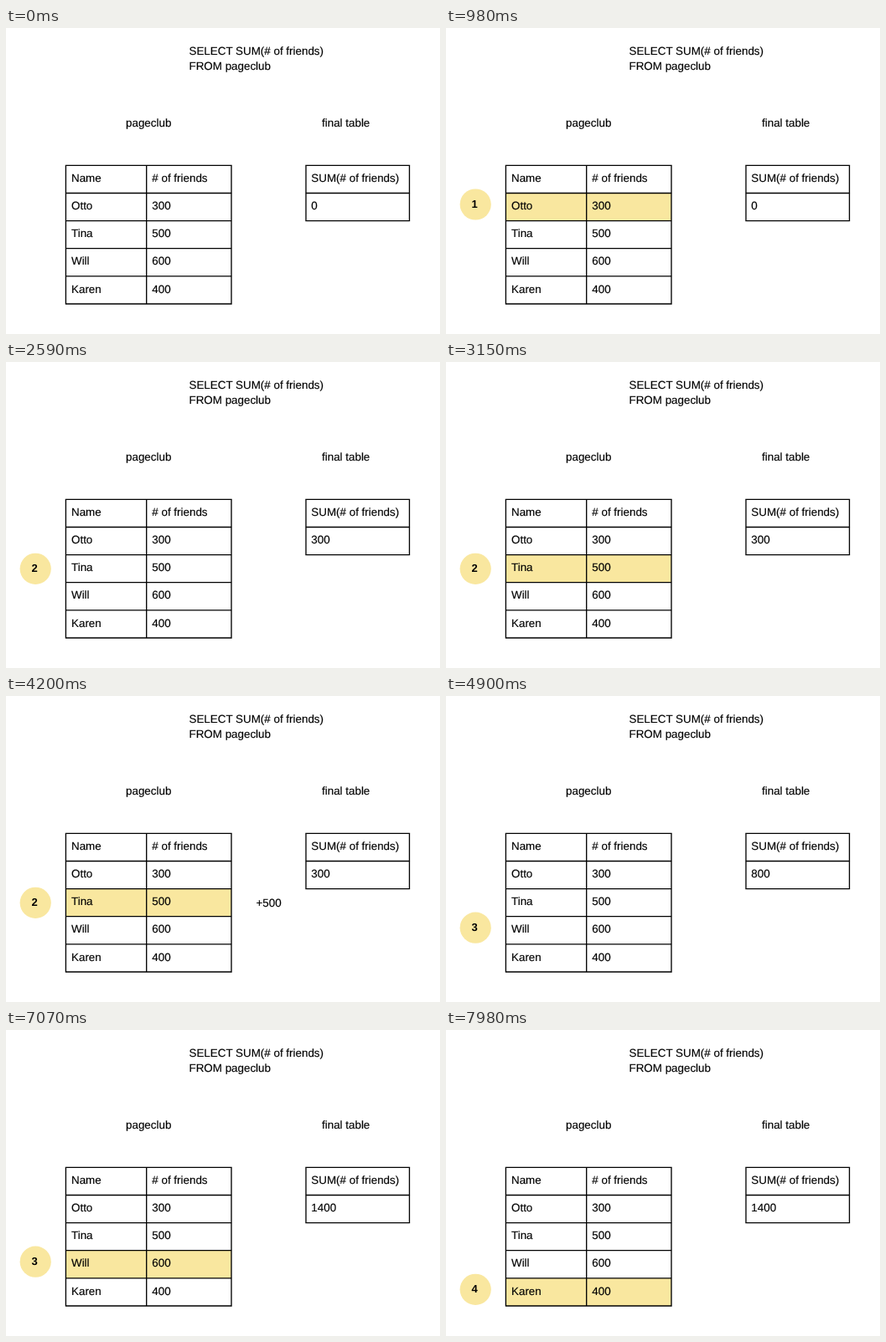
An HTML page for the animation above (8 s loop, 518 px wide and 366 px high).

```html
<!DOCTYPE html>
<html lang="en">
<head>
<meta charset="utf-8">
<title>SUM query, row by row</title>
<style>
html, body { margin: 0; width: 100%; height: 100%; overflow: hidden; background: #fff; }
svg { display: block; width: 518px; height: 366px; }
text {
  font: 13.4px "Liberation Sans", Arial, sans-serif;
  text-rendering: geometricPrecision;
  fill: #000; stroke: #000; stroke-width: .15;
}
.mark text { font-size: 13px; font-weight: bold; text-anchor: middle; stroke: none; }
.mark circle, .row { fill: #f9e79f; }
.grid { fill: none; stroke: #000; stroke-width: 1.33; }

/* each timed part is hidden except inside its own window */
.mark, .row, .add, .sum { opacity: 0; animation: 8s step-end infinite; }

.mark.a { animation-name: mark-a; }
.mark.b { animation-name: mark-b; }
.mark.c { animation-name: mark-c; }
.mark.d { animation-name: mark-d; }
@keyframes mark-a { 0% { opacity: 0 } 5.25% { opacity: 1 } 29.75% { opacity: 0 } }
@keyframes mark-b { 0% { opacity: 0 } 29.75% { opacity: 1 } 59.5% { opacity: 0 } }
@keyframes mark-c { 0% { opacity: 0 } 59.5% { opacity: 1 } 89.25% { opacity: 0 } }
@keyframes mark-d { 0% { opacity: 0 } 89.25%, 100% { opacity: 1 } }

.row.a { animation-name: row-a; }
.row.b { animation-name: row-b; }
.row.c { animation-name: row-c; }
.row.d { animation-name: row-d; }
@keyframes row-a { 0% { opacity: 0 } 11.375% { opacity: 1 } 29.75% { opacity: 0 } }
@keyframes row-b { 0% { opacity: 0 } 39.375% { opacity: 1 } 59.5% { opacity: 0 } }
@keyframes row-c { 0% { opacity: 0 } 65.625% { opacity: 1 } 89.25% { opacity: 0 } }
@keyframes row-d { 0% { opacity: 0 } 93.625%, 100% { opacity: 1 } }

.add.a { animation-name: add-a; }
.add.b { animation-name: add-b; }
.add.c { animation-name: add-c; }
@keyframes add-a { 0% { opacity: 0 } 17.5% { opacity: 1 } 24.5% { opacity: 0 } }
@keyframes add-b { 0% { opacity: 0 } 46.375% { opacity: 1 } 54.25% { opacity: 0 } }
@keyframes add-c { 0% { opacity: 0 } 72.625% { opacity: 1 } 80.5% { opacity: 0 } }

.sum.a { animation-name: sum-a; }
.sum.b { animation-name: sum-b; }
.sum.c { animation-name: sum-c; }
.sum.d { animation-name: sum-d; }
@keyframes sum-a { 0% { opacity: 1 } 24.5% { opacity: 0 } }
@keyframes sum-b { 0% { opacity: 0 } 24.5% { opacity: 1 } 54.25% { opacity: 0 } }
@keyframes sum-c { 0% { opacity: 0 } 54.25% { opacity: 1 } 80.5% { opacity: 0 } }
@keyframes sum-d { 0% { opacity: 0 } 80.5%, 100% { opacity: 1 } }
</style>
</head>
<body>
<svg viewBox="0 0 518 366">
  <text x="218.5" y="32">SELECT SUM(# of friends)</text>
  <text x="218.5" y="50">FROM pageclub</text>
  <text x="143" y="118">pageclub</text>
  <text x="377" y="118">final table</text>

  <rect class="row a" x="71.5" y="197.5" width="197.5" height="33"/>
  <rect class="row b" x="71.5" y="230.5" width="197.5" height="33"/>
  <rect class="row c" x="71.5" y="263.5" width="197.5" height="33.5"/>
  <rect class="row d" x="71.5" y="297" width="197.5" height="33"/>

  <path class="grid" d="M70.8 164.3H269.7M70.8 197.5H269.7M70.8 230.6H269.7M70.8 263.7H269.7M70.8 296.9H269.7M70.8 330H269.7M71.4 164V330M167.7 164V330M269 164V330"/>
  <path class="grid" d="M357.3 164.3H482.2M357.3 197.5H482.2M357.3 230.6H482.2M358 164V231M481.5 164V231"/>

  <text x="78" y="184">Name</text><text x="174.3" y="184"># of friends</text>
  <text x="78" y="217">Otto</text><text x="174.3" y="217">300</text>
  <text x="78" y="250">Tina</text><text x="174.3" y="250">500</text>
  <text x="78" y="283">Will</text><text x="174.3" y="283">600</text>
  <text x="78" y="317">Karen</text><text x="174.3" y="317">400</text>

  <text x="364.3" y="184">SUM(# of friends)</text>
  <text class="sum a" x="364.3" y="217">0</text>
  <text class="sum b" x="364.3" y="217">300</text>
  <text class="sum c" x="364.3" y="217">800</text>
  <text class="sum d" x="364.3" y="217">1400</text>

  <text class="add a" x="298.5" y="218">+300</text>
  <text class="add b" x="298.5" y="252">+500</text>
  <text class="add c" x="298.5" y="285">+600</text>

  <g class="mark a"><circle cx="35.2" cy="211" r="18.6"/><text x="34" y="215">1</text></g>
  <g class="mark b"><circle cx="35.2" cy="247.3" r="18.6"/><text x="34" y="251">2</text></g>
  <g class="mark c"><circle cx="35.2" cy="277.2" r="18.6"/><text x="34" y="281">3</text></g>
  <g class="mark d"><circle cx="35.2" cy="310.3" r="18.6"/><text x="34" y="314">4</text></g>
</svg>
</body>
</html>
```
